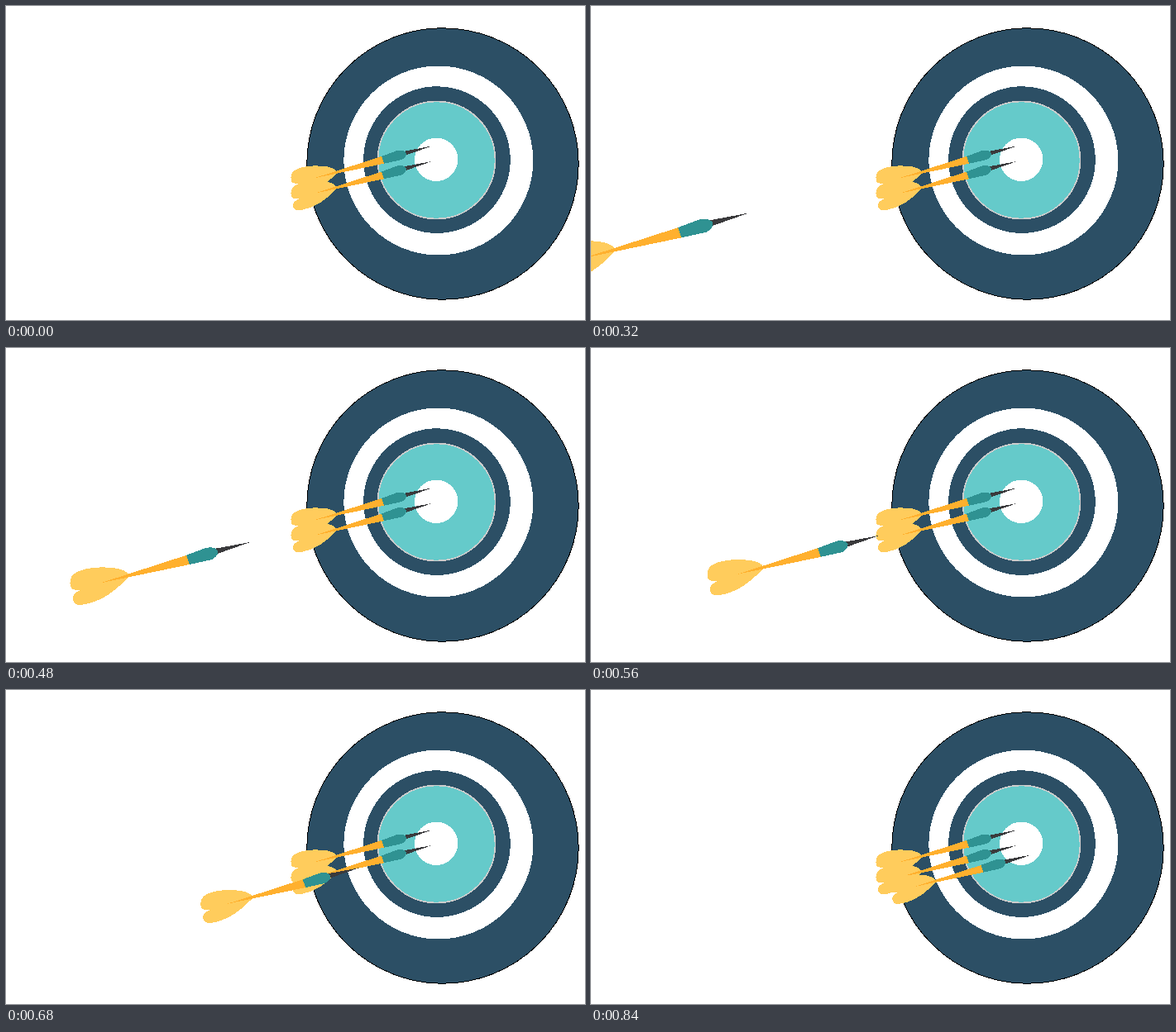
An HTML page that plays this animation: 700 by 380 pixels, repeating every 880 ms.

```html
<!DOCTYPE html>
<html lang="en">
<head>
<meta charset="utf-8">
<title>Darts</title>
<style>
  html, body { margin: 0; width: 100%; height: 100%; overflow: hidden; background: #fff; }
  svg { display: block; width: 700px; height: 380px; shape-rendering: crispEdges; }
</style>
</head>
<body>
<svg viewBox="0 0 700 380">
  <defs>
    <!-- The tip of the dart is the origin -->
    <g id="dart">
      <path fill="#ffcc5c" d="M-145 39.5C-150 31-166 30-180 30C-198 30.5-214 35-216 44C-217.5 50-217 56-212 57L-204 57.5C-210 60-214.5 64-213.5 69C-212 74-209 76-203 75.5C-178 72-162 58-147 43Q-145 41-145 39.5Z"/>
      <path fill="#ffb02e" d="M-180 49L-76 15.3L-72 26.5Z"/>
      <path fill="#3a3a3c" d="M1.5-.6L-41 7.3L-39 13.7Z"/>
      <path fill="#2f9292" d="M-76.2 15.3L-54 7C-46 4.5-39 6.5-38 10.5C-37.5 14-40 18-45 20.5L-72.4 26.6Z"/>
    </g>
  </defs>
  <circle cx="528" cy="191" r="164.2" fill="#2c4f65" stroke="#000"/>
  <circle cx="522.8" cy="187" r="114.5" fill="#fff"/>
  <circle cx="521" cy="186.1" r="88.8" fill="#2c4f65"/>
  <circle cx="520.5" cy="186.5" r="71" fill="#65caca" stroke="#ccc" stroke-width="1.7"/>
  <circle cx="520.2" cy="185.8" r="26.2" fill="#fff"/>
  <use href="#dart" transform="translate(513.5 170) scale(.78)"/>
  <use href="#dart" transform="translate(513.5 188.5) scale(.78)"/>
  <use href="#dart" id="flying"/>
</svg>
<script>
  const LOOP = 880, STEP = 40, LANDING = 840;
  const flying = document.getElementById('flying');

  function draw() {
    const time = Math.floor(performance.now() % LOOP / STEP) * STEP;
    const left = LANDING - time;
    const x = 530.8 - left * 0.6575;
    const y = 200 + left * 0.0985;
    const scale = 0.78 + left * 0.00061;
    flying.setAttribute('transform', `translate(${x} ${y}) scale(${scale})`);
    requestAnimationFrame(draw);
  }
  draw();
</script>
</body>
</html>
```
